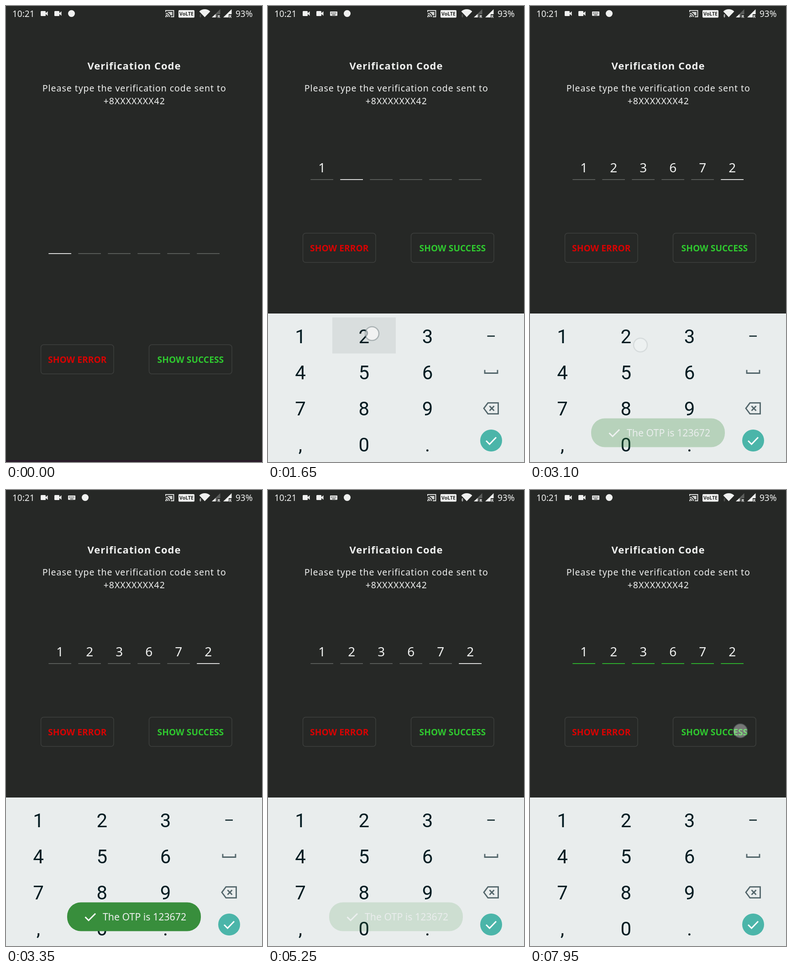
These frames come from a looping animation (561x998 px, 8000 ms). An HTML page:

```html
<!DOCTYPE html>
<html lang="en">
<head>
<meta charset="utf-8">
<title>Verification Code</title>
<style>
  html, body { margin: 0; width: 100%; height: 100%; overflow: hidden; background: #262826; }
  svg { display: block; width: 561px; height: 998px; }
  text { font-family: "Noto Sans", sans-serif; fill: #f0f1f0; }
  .mid { text-anchor: middle; }
  .btn { font-weight: 700; font-size: 19.3px; }
  .box { fill: none; stroke: #3d3f3d; stroke-width: 1.5; }
  .keys text { font: 42px Roboto, sans-serif; fill: #041c22; text-anchor: middle; }
  .line { fill: none; stroke: #52656a; stroke-width: 2.8; }
  .tick { fill: none; stroke: #fff; stroke-width: 3; }
</style>
</head>
<body>
<svg viewBox="0 0 561 998">
  <defs>
    <g id="cam"><rect y="11" width="11" height="11" rx="1.5"/><path d="M10 16.5L15.5 11.5V21.5Z"/></g>
  </defs>
  <rect width="561" height="998" fill="#262826"/>
  <rect y="994" width="561" height="4" fill="#2a1c2b"/>

  <g fill="#f0f1f0">
    <text x="14" y="24" font-size="19">10:21</text>
    <use href="#cam" x="76"/><use href="#cam" x="106"/>
    <g id="ime">
      <rect x="136" y="12" width="16" height="9.5" rx="1"/>
      <path d="M138 14.5H150.5M138 17H150.5" stroke="#262826" stroke-width="1.3" stroke-dasharray="1.3 1.2"/>
      <path d="M140.5 19.6H147.5" stroke="#262826" stroke-width="1.2"/>
    </g>
    <circle id="app" cx="143.5" cy="16.5" r="7.5"/>
    <g fill="none" stroke="#f0f1f0" stroke-width="1.8">
      <path d="M350 13V9.9H367.5V23.5H361M350 16A8 8 0 0 1 358 24M350 19.6A4.4 4.4 0 0 1 354.4 24"/>
    </g>
    <path d="M354 13H364.5V20.5H360.5A11 11 0 0 0 354 14Z" opacity=".85"/>
    <circle cx="350.5" cy="23" r="1.5"/>
    <rect x="378" y="9" width="35" height="16.5" rx="2"/>
    <text class="mid" x="395.5" y="21.3" font-size="10.5" font-weight="800" style="fill:#262826">VoLTE</text>
    <path d="M435.5 24.5L423.5 12A17 17 0 0 1 447.5 12Z"/>
    <path id="data" d="M424 21L426 18L428 21ZM424 22.3H428L426 25.3Z"/>
    <path d="M469.5 7V18H463V25H451Z" fill="#5c5e5c"/>
    <path d="M459.5 17.5V25H451Z"/>
    <path d="M494.5 7V18H488V25H476Z"/>
    <text x="463.5" y="25.5" font-size="9" font-weight="700">R</text>
    <text x="488.5" y="25.5" font-size="9" font-weight="700">R</text>
    <text x="503" y="24" font-size="19">93%</text>
  </g>

  <text class="mid" x="281" y="138.5" font-size="22" font-weight="700" letter-spacing="1">Verification Code</text>
  <g class="mid" font-size="19.5" letter-spacing=".95">
    <text x="281.3" y="187">Please type the verification code sent to</text>
    <text x="281.3" y="215">+8XXXXXXX42</text>
  </g>

  <g id="code"></g>
  <g id="buttons">
    <rect class="box" x="76.5" y="497.3" width="159.5" height="64" rx="6"/>
    <rect class="box" x="313.5" y="497.3" width="181.5" height="64" rx="6"/>
    <text class="mid btn" x="156.3" y="536.7" style="fill:#d80202">SHOW ERROR</text>
    <text class="mid btn" x="404.4" y="536.7" style="fill:#2fc82f">SHOW SUCCESS</text>
  </g>

  <g id="board">
    <rect y="673" width="561" height="325" fill="#f5f9f9"/>
    <g id="keys" class="keys">
      <rect y="673" width="561" height="325" fill="#e9eded"/>
      <rect id="press" width="139" height="79" fill="#d9dede"/>
      <g id="labels"></g>
      <path class="line" d="M480.5 722.5H497" style="stroke:#22373b"/>
      <path class="line" d="M475 796.5V803.5H503V796.5"/>
      <path class="line" d="M482 868.6H504.5V892.6H482L473 880.6ZM485.5 875.5L495.5 885.7M495.5 875.5L485.5 885.7"/>
      <circle cx="489" cy="951" r="24" fill="#4bb5a9"/>
      <path class="tick" d="M478 951.5L485.5 959L500 944"/>
    </g>
  </g>

  <g id="toast">
    <rect x="134" y="902.5" width="293" height="63" rx="30" fill="#388e3c"/>
    <path class="tick" d="M173.5 934.5L181 942L196 927"/>
    <text x="212" y="942" font-size="21.3">The OTP is 123672</text>
  </g>
  <circle id="dot" r="15" fill="#fff" fill-opacity=".62" stroke="#7d878a" stroke-opacity=".55" stroke-width="2.5"/>
</svg>

<script>
const LOOP = 8000, STEP = 50, FADE = 250;
const $ = id => document.getElementById(id);
const set = (el, attrs) => { for (const k in attrs) el.setAttribute(k, attrs[k]); };
const clamp = v => Math.max(0, Math.min(1, v));
const ramp = (t, from, to) => clamp((t - from) / (to - from));
const add = (parent, tag, attrs, text = "") => {
  const el = document.createElementNS("http://www.w3.org/2000/svg", tag);
  set(el, attrs);
  el.textContent = text;
  parent.append(el);
  return el;
};

// Touches: x, y, down, up, typed digit
const touches = [
  [126, 523, 150, 400],
  [82, 722, 1350, 1450, 1],
  [228, 717, 1600, 1720, 2],
  [362, 722, 2100, 2200, 3],
  [362, 802, 2350, 2450, 6],
  [84, 882, 2580, 2680, 7],
  [242, 742, 2840, 2930, 2],
  [190, 528, 5900, 5930],
  [461, 527, 7750, 7850]
].map(([x, y, down, up, key]) => ({ x, y, down, up, key }));
const typed = touches.filter(p => p.key);

[..."123456789,0."].forEach((c, i) =>
  add($("labels"), "text", { x: 71 + i % 3 * 139.3, y: 737.5 + Math.floor(i / 3) * 79 }, c));

const cells = typed.map((p, i) => ({
  line: add($("code"), "rect", { x: 93.3 + i * 65, y: 379, width: 49.7, height: 1.6 }),
  digit: add($("code"), "text", { x: 118.2 + i * 65, y: 364, "font-size": 28, class: "mid" }, p.key)
}));

function drawTouch(t) {
  const p = touches.findLast(p => t >= p.down);
  const held = p && t < p.up;
  set($("dot"), { opacity: p ? 1 - ramp(t, p.up, p.up + FADE) : 0, cx: p ? p.x : 0, cy: p ? p.y : 0 });
  set($("press"), { opacity: held && p.key ? 1 : 0 });
  if (held && p.key) {
    set($("press"), { x: 2 + (p.key - 1) % 3 * 139, y: 681.5 + Math.floor((p.key - 1) / 3) * 79 });
  }
}

function drawCode(t) {
  const count = typed.filter(p => t >= p.up).length;
  const active = Math.min(count, 5);
  const result = t >= 7900 ? "#2fc82f" : t >= 6000 ? "#c80808" : "";
  cells.forEach(({ line, digit }, i) => {
    set(line, { fill: result || (i === active ? "#fff" : "#636563") });
    set(digit, { opacity: i < count ? 1 : 0 });
  });
}

function draw(t) {
  const open = t >= 400;
  const rise = 1 - (1 - ramp(t, 380, 630)) ** 2;
  const shift = ramp(t, 650, 850);
  set($("board"), { visibility: open ? "visible" : "hidden" });
  set($("keys"), { opacity: rise, transform: `translate(0 ${140 * (1 - rise)})` });
  set($("code"), { transform: `translate(0 ${open ? 0 : 162})` });
  set($("buttons"), { transform: `translate(0 ${open ? 0 : 244})` });
  set($("ime"), { opacity: shift });
  set($("app"), { cx: 143.5 + 30 * shift });
  set($("data"), { opacity: t >= 2500 && t < 5550 ? 1 : 0.3 });
  set($("toast"), { opacity: ramp(t, 3005, 3350) * (1 - ramp(t, 4970, 5300)) });
  drawCode(t);
  drawTouch(t);
}

const start = performance.now();
function tick() {
  const t = (performance.now() - start) % LOOP;
  draw(Math.floor(t / STEP) * STEP);
  requestAnimationFrame(tick);
}
tick();
</script>
</body>
</html>
```
